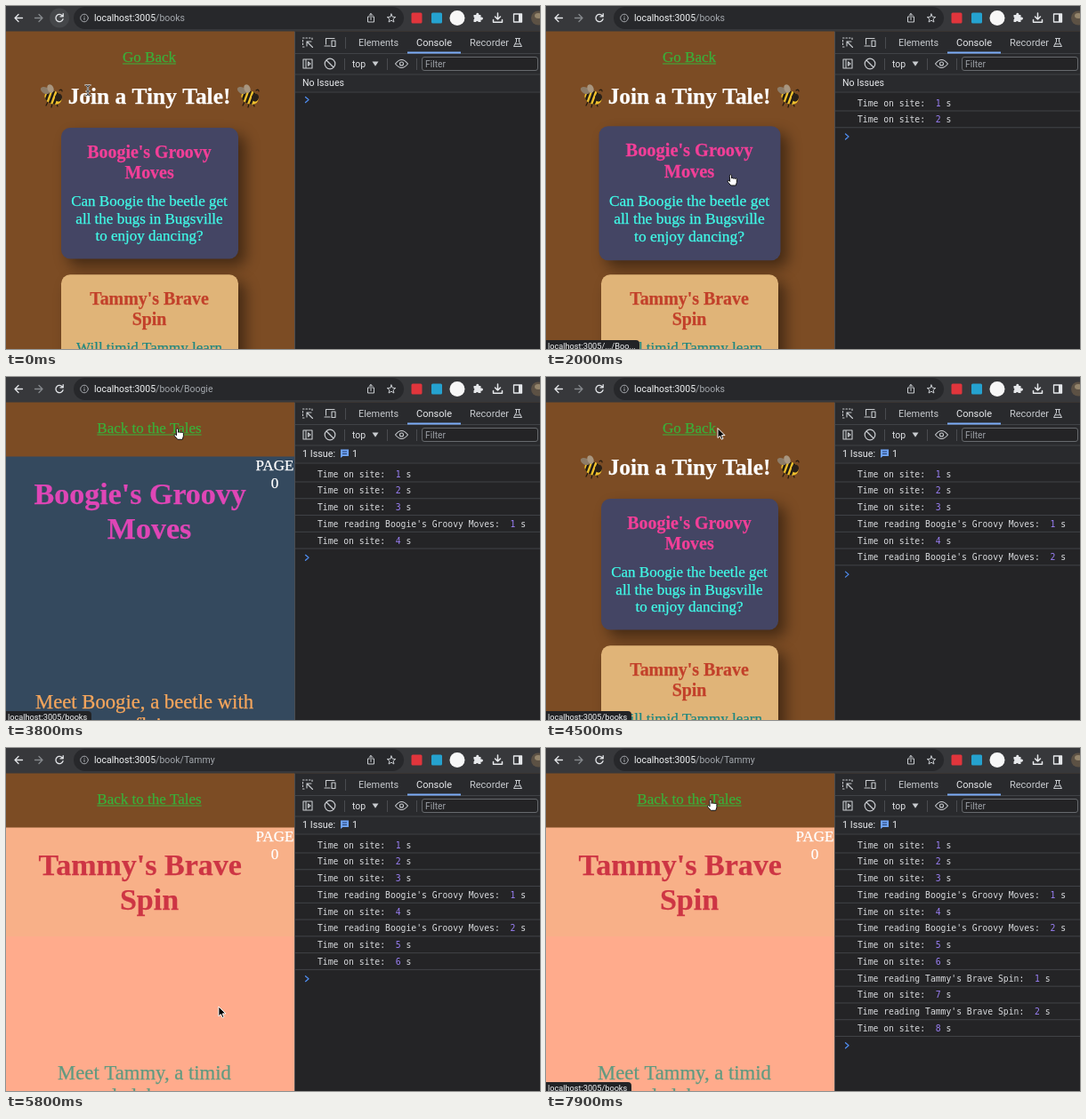
Animation of 600x386 px, one loop 8000 ms. Source, as an HTML page with a canvas:

```html
<!DOCTYPE html>
<html lang="en">
<head>
<meta charset="utf-8">
<title>Tiny tales</title>
<style>
html, body { margin: 0; width: 100%; height: 100%; overflow: hidden; background: #242424; }
canvas { display: block; width: 600px; height: 386px; }
</style>
</head>
<body>
<canvas id="stage"></canvas>
<script>
const LOOP = 8000, W = 600, H = 386;
const canvas = document.getElementById('stage');
const dpr = window.devicePixelRatio || 1;
canvas.width = W * dpr;
canvas.height = H * dpr;
const c = canvas.getContext('2d');

const SERIF = '"Liberation Serif", "Times New Roman", serif';
const UI = 'Roboto, "Open Sans", sans-serif';
const MONO = '9.72px "DejaVu Sans Mono", monospace';
const ui = px => `${px}px ${UI}`;

const BROWN = '#7c4c24', GREEN = '#3ab03a', ICON = '#c9ccd0', RULE = '#414347';

const BOOGIE = {
  name: 'Boogie', title: ["Boogie's Groovy", 'Moves'],
  blurb: ['Can Boogie the beetle get', 'all the bugs in Bugsville', 'to enjoy dancing?'],
  top: 137, card: '#444564', head: '#f23f98', body: '#40fbe8',
  page: ['#34495e', '#34495e'], pageHead: '#df46b6', pageBody: '#f6a65c',
  intro: ['Meet Boogie, a beetle with', 'a flair']
};
const TAMMY = {
  name: 'Tammy', title: ["Tammy's Brave", 'Spin'],
  blurb: ['Will timid Tammy learn', 'to spin her web', 'in time?'],
  top: 302.2, card: '#e0b478', head: '#c2402a', body: '#1f8780',
  page: ['#f8b088', '#ffab8c'], pageHead: '#cd3544', pageBody: '#609a80',
  intro: ['Meet Tammy, a timid', 'ladybug']
};

// Page visits: start, end, book
const VISITS = [[2100, 4300, BOOGIE], [5500, LOOP, TAMMY]];
// Card hovers: start, end, book
const HOVERS = [[1900, 2100, BOOGIE], [4750, 5020, BOOGIE], [5080, 5500, TAMMY]];
// Status bubble: start, end, text, width
const STATUS = [
  [1950, 2350, 'localhost:3005/.../Boo...', 105],
  [2800, 4800, 'localhost:3005/books', 96],
  [4800, 5150, 'localhost:3005/.../Boo...', 105],
  [5150, 5700, 'localhost:3005/.../Tam...', 105],
  [7600, LOOP, 'localhost:3005/books', 96]
];
// Pointer: time, x, y
const PATH = [
  [0, 92, 95], [250, 92, 95], [600, 262, 105], [1000, 304.5, 151], [1450, 304.5, 151],
  [1950, 208, 190], [2150, 208, 188], [2600, 208, 66], [2800, 193, 58], [4500, 193, 58],
  [5250, 227, 326], [5600, 227, 326], [6300, 287, 151], [7100, 287, 151],
  [7600, 185.5, 58], [LOOP, 185.5, 58]
];
const HANDS = [[1900, 2150], [2720, 4350], [4750, 5020], [5080, 5550], [7520, LOOP]];

// Log lines: [time, label, seconds]
const LOGS = [];
for (let n = 1; n <= 8; n++) LOGS.push([n * 1000 - 400, 'Time on site:', n]);
for (const [start, , book] of VISITS)
  for (let n = 1; n <= 2; n++)
    LOGS.push([start + n * 1000, `Time reading ${book.title.join(' ')}:`, n]);
LOGS.sort((a, b) => a[0] - b[0]);

const at = (list, t) => list.find(e => t >= e[0] && t < e[1]);

function text(s, x, y, font, color, align = 'left') {
  c.font = font;
  c.fillStyle = color;
  c.textAlign = align;
  c.fillText(s, x, y);
}
// Centred page text, slightly thickened like smoothed screen type
function story(s, x, y, px, color, weight = 'normal') {
  text(s, x, y, `${weight} ${px}px ${SERIF}`, color, 'center');
  c.strokeStyle = color;
  c.lineWidth = .25;
  c.strokeText(s, x, y);
}
function rect(x, y, w, h, color) {
  c.fillStyle = color;
  c.fillRect(x, y, w, h);
}
function round(x, y, w, h, r, color) {
  c.beginPath();
  c.roundRect(x, y, w, h, r);
  c.fillStyle = color;
  c.fill();
}
function oval(x, y, rx, ry, turn, color) {
  c.beginPath();
  c.ellipse(x, y, rx, ry, turn, 0, 7);
  c.fillStyle = color;
  c.fill();
}
function shape(d, x, y, stroke, fill, width = 1.3) {
  const p = new Path2D(d);
  c.save();
  c.translate(x, y);
  c.lineJoin = c.lineCap = 'round';
  c.lineWidth = width;
  if (fill) { c.fillStyle = fill; c.fill(p); }
  if (stroke) { c.strokeStyle = stroke; c.stroke(p); }
  c.restore();
}
function link(s) {
  story(s, 161, 62.7, 17, GREEN);
  const w = c.measureText(s).width;
  rect(161 - w / 2, 64.5, w, 1, GREEN);
}

function bee(x, y) {
  c.save();
  c.translate(x, y);
  shape('M-4 7L-6 11M1 9L0 13M6 9L7 12M9 -6Q12 -8 12 -5', 0, 0, '#231a10', null, 1.2);
  c.save();
  c.translate(2, 2);
  c.rotate(.35);
  c.beginPath();
  c.ellipse(0, 0, 10, 7.5, 0, 0, 7);
  c.clip();
  rect(-10, -8, 20, 16, '#f0c02c');
  for (const sx of [-8, -3, 2]) rect(sx, -8, 2.6, 16, '#1f1a14');
  c.restore();
  oval(8, 2, 4, 4.5, .3, '#2a2118');
  oval(-7, -6, 5.5, 3.6, .5, '#8d7c68');
  oval(-1, -8, 3.5, 5, -.4, '#a89680');
  c.restore();
}

function card(b, grow) {
  c.save();
  const cy = b.top + 74, k = 1 + .05 * grow;
  c.translate(161.5, cy);
  c.scale(k, k);
  c.translate(-161.5, -cy);
  c.save();
  c.shadowColor = 'rgba(0,0,0,.45)';
  c.shadowBlur = 16 * dpr;
  c.shadowOffsetX = c.shadowOffsetY = 8 * dpr;
  round(62, b.top, 199, 147.5, 10, b.card);
  c.restore();
  b.title.forEach((s, i) => story(s, 161, b.top + 33.5 + i * 23, 19.9, b.head, 'bold'));
  b.blurb.forEach((s, i) => story(s, 161, b.top + 88 + i * 19.5, 17, b.body));
  c.restore();
}

function listPage(t) {
  link('Go Back');
  story('Join a Tiny Tale!', 161, 110, 25.4, '#fff', 'bold');
  bee(51, 101);
  bee(272, 101);
  const h = at(HOVERS, t);
  for (const b of [BOOGIE, TAMMY])
    card(b, h && h[2] === b ? Math.min(1, (t - h[0]) / 200) : 0);
}

function bookPage(b) {
  link('Back to the Tales');
  rect(0, 89.5, 324, 122.5, b.page[0]);
  rect(0, 212, 324, 174, b.page[1]);
  story('PAGE', 302, 105, 17, '#fff');
  story('0', 302, 124.5, 17, '#fff');
  story(b.title[0], 150.7, 143, 34, b.pageHead, 'bold');
  story(b.title[1], 161, 182, 34, b.pageHead, 'bold');
  b.intro.forEach((s, i) => story(s, 155.5, 373 + i * 26, 22.7, b.pageBody));
}

function toolbar(path, t) {
  rect(0, 0, W, 28.5, '#37383b');
  round(76, 1, 371, 25, 12.5, '#27282b');
  if (t < 300) oval(60, 13.5, 11, 11, 0, '#45474a');
  shape('M4.5 0H-4M0 -4L-4 0L0 4', 14, 13.5, '#e3e5e8');
  shape('M-4.5 0H4M0 -4L4 0L0 4', 37, 13.5, '#85888c');
  shape('M3.5 -2.2A4.1 4.1 0 1 0 4 1.2M4.2 -4.8V-1.6H1', 60, 13.5, '#e3e5e8');
  shape('M4.3 0A4.3 4.3 0 1 1 -4.3 0A4.3 4.3 0 1 1 4.3 0M0 -.4V2M0 -2.2V-2.1', 88, 13.5, '#a8abb0', null, 1);
  const host = 'localhost:3005';
  text(host, 99, 17, ui(10.5), '#f1f3f4');
  text(path, 99 + c.measureText(host).width, 17, ui(10.5), '#a3a7ac');
  shape('M-1.6 -1.5H-3.5V4.5H3.5V-1.5H1.6M0 2V-5M-2 -3L0 -5L2 -3', 410, 13.5, ICON, null, 1);
  let star = '';
  for (let i = 0; i < 10; i++) {
    const r = i % 2 ? 2.2 : 5, a = i * Math.PI / 5 - Math.PI / 2;
    star += (i ? 'L' : 'M') + r * Math.cos(a) + ' ' + r * Math.sin(a);
  }
  shape(star + 'Z', 433, 14, ICON, null, 1);
  round(455.5, 7.5, 12, 12, 1.5, '#e0353c');
  round(478, 7.5, 12, 12, 1.5, '#25a2cf');
  oval(507, 13.5, 8.5, 8.5, 0, '#f7f7f7');
  shape('M-4.5 -3H-1.7A1.6 1.6 0 1 1 1.3 -3H3.5V-.3A1.6 1.6 0 1 1 3.5 2.4V5H.8A1.5 1.5 0 0 0 -2 5H-4.5V2.2A1.5 1.5 0 0 0 -4.5 -.5Z', 530, 13, null, '#e6e8eb');
  shape('M0 -5V2M-3 -1L0 2L3 -1M-5 2.5V5.2H5V2.5', 552.5, 13, '#e6e8eb', null, 1.5);
  shape('M-4.5 -4.5H4.5V4.5H-4.5Z', 575, 13.5, '#e6e8eb');
  rect(576, 9, 3.5, 9, '#e6e8eb');
  oval(598, 13.5, 8, 8, 0, '#5c5144');
  oval(598, 11, 4, 3, 0, '#94856c');
}

function devtools(t) {
  rect(324, 28.5, 276, 358, '#242426');
  rect(324, 28.5, 276, 68, '#292a2d');
  rect(324, 28.5, 1, 358, '#4a4c50');
  for (const y of [53, 76.5, 96.5]) rect(325, y, 275, 1, RULE);

  shape('M-5.5 -5H-4M-2 -5H-.5M1.5 -5H3M5 -5V-3.5M-5.5 -2.5V-1M-5.5 1V2.5M-5.5 5H-4M-1 -1L5.5 5.5M-1 4V-1H4', 339, 41, ICON, null, 1.1);
  shape('M-6 4H0M-4.5 2V-4.5H5M2 -2H6V4.5H2Z', 364, 41, ICON, null, 1.1);
  rect(381, 35, 1, 13, '#4a4c50');
  text('Elements', 396, 45, ui(10.9), '#c6c9cd');
  text('Console', 461, 45, ui(11), '#e8eaed');
  text('Recorder', 521, 45, ui(11), '#c6c9cd');
  rect(451, 51.5, 60, 2, '#7cacf8');
  shape('M-2.5 -4.5H2.5M-1.5 -4.5V-1L-4.5 4.5H4.5L1.5 -1V-4.5M-2.8 1.8H2.8', 575, 41, ICON, null, 1);

  shape('M-5 -5H5V5H-5ZM-2 -5V5M.5 -2.2L3 0L.5 2.2Z', 339, 65, ICON, null, 1.1);
  shape('M5.8 0A5.8 5.8 0 1 1 -5.8 0A5.8 5.8 0 1 1 5.8 0M-4 -4L4 4', 364, 65, ICON, null, 1.2);
  text('top', 389, 68.5, ui(10.5), '#e0e2e5');
  shape('M-3.5 -2.5H3.5L0 2.8Z', 415, 65, null, ICON);
  shape('M-7 0Q0 -9 7 0Q0 9 -7 0ZM2 0A2 2 0 1 1 -2 0A2 2 0 1 1 2 0', 444.5, 65, ICON, null, 1.1);
  for (const x of [380, 428, 461]) rect(x, 59, 1, 13, '#4a4c50');
  round(467.5, 57.5, 130, 15, 2.5, '#242426');
  c.strokeStyle = '#66696d';
  c.lineWidth = 1;
  c.stroke();
  text('Filter', 471, 68.7, ui(10.3), '#9b9fa5');

  if (t < VISITS[0][0]) {
    text('No Issues', 333, 90, ui(10.6), '#e8eaed');
  } else {
    text('1 Issue:', 333, 90, ui(10.8), '#e8eaed');
    shape('M-4.5 -4.5H4.5V3H-2L-4.5 5Z', 380.5, 86, null, '#6ea2f5');
    rect(378, 83.5, 5, 1, '#25406e');
    rect(378, 86, 5, 1, '#25406e');
    text('1', 389, 90, ui(10.8), '#e8eaed');
  }

  const rows = LOGS.filter(l => t >= l[0]), pitch = 18.77, em = 5.852;
  rows.forEach(([, label, n], i) => {
    const y = 112.5 + i * pitch, x = 350 + (label.length + 2) * em;
    text(label, 350, y, MONO, '#d8dadd');
    text(n, x, y, MONO, '#9a7ff5');
    text('s', x + 2 * em, y, MONO, '#d8dadd');
    rect(325, 117.5 + i * pitch, 275, 1, RULE);
  });
  const py = rows.length ? 109.5 + rows.length * pitch : 105.5;
  shape('M-1.5 -3L2 0L-1.5 3', 338, py, '#4f8df0', null, 1.3);
}

function pointer(t) {
  const i = Math.max(1, PATH.findIndex(p => p[0] > t));
  const a = PATH[i - 1], b = PATH[i];
  let u = (t - a[0]) / (b[0] - a[0]);
  u = u * u * (3 - 2 * u);
  const x = a[1] + (b[1] - a[1]) * u, y = a[2] + (b[2] - a[2]) * u;
  if (t < 600) {
    const beam = 'M-2.5 -6Q0 -6 0 -4Q0 -6 2.5 -6M0 -4V4M-2.5 6Q0 6 0 4Q0 6 2.5 6M-1.5 1H1.5';
    shape(beam, x, y, '#fff', null, 2.2);
    shape(beam, x, y, '#222', null, 1);
  } else if (at(HANDS, t)) {
    shape('M2.5 1.2A1.1 1.1 0 0 1 4.7 1.2V4.4A1.1 1.1 0 0 1 6.7 4.6A1.1 1.1 0 0 1 8.7 4.9A1 1 0 0 1 10.6 5.6V8.6L9.5 12.3H4L.6 8.4C-.4 6.8 1 6 2 7L2.5 7.5Z',
      x - 4.2, y, '#111', '#fff', 1);
  } else {
    shape('M0 0V10.5L2.5 8.3L4.2 12.2L6 11.4L4.4 7.6H7.6Z', x, y, '#fff', '#000', 1);
  }
}

function draw(t) {
  c.setTransform(dpr, 0, 0, dpr, 0, 0);
  c.textBaseline = 'alphabetic';
  rect(0, 0, W, H, BROWN);
  const visit = at(VISITS, t);
  if (visit) bookPage(visit[2]);
  else listPage(t);
  devtools(t);
  toolbar(visit ? '/book/' + visit[2].name : '/books', t);
  const s = at(STATUS, t);
  if (s) {
    round(-1, 376, s[3] + 1, 12, [0, 4, 0, 0], '#222326');
    text(s[2], 2, 385.6, ui(9.2), '#f1f3f4');
  }
  pointer(t);
}

const begin = performance.now();
function tick() {
  const t = (performance.now() - begin) % LOOP;
  draw(Math.floor(t / 100) * 100);
  requestAnimationFrame(tick);
}
tick();
</script>
</body>
</html>
```
